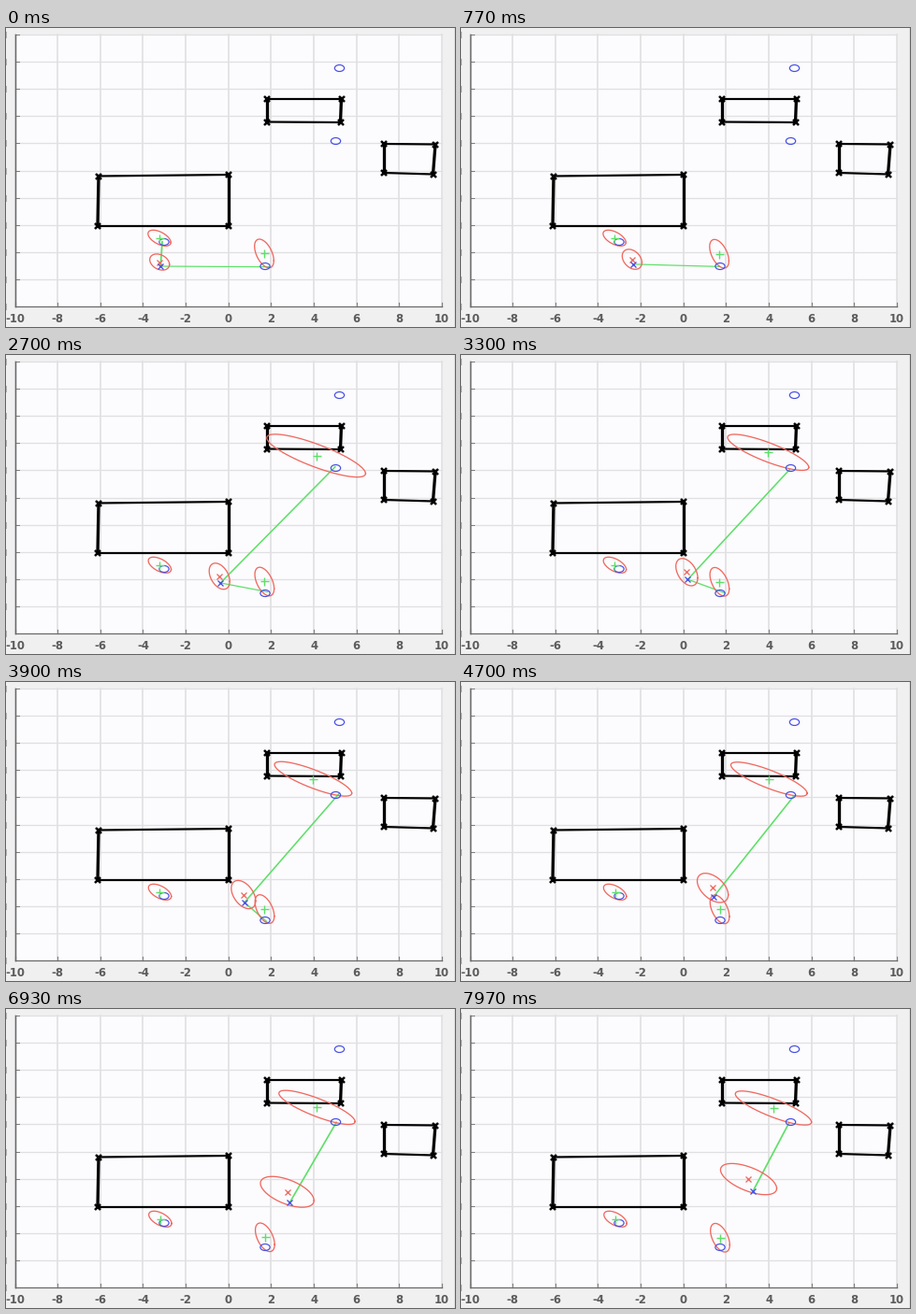
Animation of 480x320 px, one loop 8 s. Source, as a matplotlib script:

```python
import numpy as np
import matplotlib.pyplot as plt
from matplotlib.animation import FuncAnimation
from matplotlib.patches import Ellipse, Rectangle

W, H, DPI = 480, 320, 100
PX = 72 / DPI                      # one pixel in points
FRAMES, STEP = 200, 40
SCALE = np.array([22.83, -14.55])  # pixels per metre
RANGE = 10.08                      # sensor reach, metres
ASPECT = 1.5                       # strokes are wider across than down

RED, GREEN, BLUE = "#f0685f", "#5ce068", "#464fe4"

MARKS = np.array([[169, 229], [277, 255], [352.5, 121], [356.5, 43]])
ROOMS = [[(99, 158.5), (238, 157), (238, 211.5), (98, 211.5)],
         [(279, 75.5), (358.5, 75.5), (357.5, 101), (279, 100.5)],
         [(404, 124), (459, 124.5), (456.5, 156.5), (404, 155)]]

noise = np.random.default_rng(4).normal(0, (3, 1), (FRAMES, 4, 2))


def path(u):
    """True robot position at loop fraction u."""
    return np.array([165.2 + u * (197.4 - 2.8 * u - 47.2 * u * u),
                     255 - u * (19 + 42 * u)])


def pose_oval(u):
    """Estimated position drifts off the path while its spread grows."""
    x, y = path(u)
    return (x - 1 - 4 * u ** 6, y - 4.5 - 8 * u,
            10.5 + 20 / (1 + np.exp((.66 - u) / .09)),
            8.6 + 8.5 * (1 - np.exp(-3 * u)), .3 + .3 * u)


def mark_ovals(u):
    """Landmark estimates; the third shrinks after its first sighting."""
    fresh = np.exp((.3375 - u) / .05)
    return [(164 + u, 224.8, 12.2, 8.5, .55),
            (276 + u, 241.3 + 3.5 * u, 10.3, 15.3, .5),
            (322.5 + 11.5 * u + 5 * fresh, 101 + 5 * u + 4.8 * fresh,
             40.7 + 11.5 * fresh, 18.2 + 4.5 * fresh, .83)]


def outline(cx, cy, a, b, rho):
    """Covariance ellipse with half extents a, b and correlation rho."""
    s = np.linspace(0, 2 * np.pi, 80)
    return (cx + a * np.cos(s),
            cy + b * (rho * np.cos(s) + np.sqrt(1 - rho * rho) * np.sin(s)))


def stroke(dx, dy, width):
    """Width in points of a line drawn along (dx, dy)."""
    return width * PX * np.hypot(dx, ASPECT * dy) / np.hypot(dx, dy)


fig = plt.figure(figsize=(W / DPI, H / DPI), dpi=DPI, facecolor="#f1f0f1")
ax = fig.add_axes([0, 0, 1, 1])
ax.set(xlim=(0, W), ylim=(H, 0))
ax.axis("off")


def line(p, q, color, width, **kw):
    return ax.plot([p[0], q[0]], [p[1], q[1]], color=color,
                   lw=stroke(q[0] - p[0], q[1] - p[1], width), **kw)[0]


def points(style, color, size, width, z=7):
    return ax.plot([], [], color=color, marker=style, ls="", ms=size * PX,
                   mew=width * PX, zorder=z)[0]


# Plot area, grid and labels
ax.add_patch(Rectangle((9.5, 7), 456.5, 291, fc="#fcfbfd", ec="none"))
for k in range(11):
    x, y = 9.5 + 45.65 * k, 7 + 29.1 * k
    line((x, 7), (x, 298), "#e0dfe1", 1.1)
    line((9.5, y), (466, y), "#e0dfe1", 1.3)
    line((x, 294), (x, 298), "#808080", .8)
    line((9.5, y), (14, y), "#808080", 1)
    line((.3, y - 3), (.3, y + 3), "#b0b0b0", .7)
    ax.text(x, 310, str(2 * k - 10), family="DejaVu Sans", weight="bold",
            size=11.6 * PX, color="#5c5c5c", ha="center",
            va="center_baseline")
line((9.5, 7), (9.5, 298), "#686868", 1)
line((9.5, 298), (466, 298), "#686868", 1.2)
line((479.5, 0), (479.5, H), "#303030", .8)

for room in ROOMS:
    for p, q in zip(room, room[1:] + room[:1]):
        line(p, q, "black", 2.2, zorder=3)
    points("x", "black", 6.3, 2.5, 3).set_data(*zip(*room))
for spot in MARKS:
    ax.add_patch(Ellipse(spot, 10.3, 7, fill=False, ec=BLUE, lw=1.2 * PX,
                         zorder=6))

beams = [line((0, 0), (1, 0), GREEN, 1.2, zorder=4) for _ in MARKS]
rings = [line((0, 0), (1, 0), RED, 1.3, zorder=5) for _ in range(4)]
pluses = points("+", GREEN, 9, 1.4, 6)
guess = points("x", RED, 6.5, 1.3)
robot = points("x", BLUE, 6, 1.3)


def draw(i):
    u = i / FRAMES
    pos = path(u)
    ahead = (path(u + .001) - pos) / SCALE
    for beam, mark, off in zip(beams, MARKS, noise[i]):
        ray = (mark - pos) / SCALE
        end = mark + off
        beam.set_data([pos[0], end[0]], [pos[1], end[1]])
        beam.set_linewidth(stroke(*(end - pos), 1.2))
        beam.set_visible(ray @ ahead > 0 and np.hypot(*ray) < RANGE)

    # The third landmark joins the map once it has been in reach
    met = beams[2].get_visible() or u > .5
    known = mark_ovals(u)[:3 if met else 2]
    pose = pose_oval(u)
    rings[3].set_visible(met)
    for ring, oval in zip(rings, [pose] + known):
        ring.set_data(*outline(*oval))
    pluses.set_data([k[0] for k in known], [k[1] for k in known])
    guess.set_data([pose[0]], [pose[1]])
    robot.set_data([pos[0]], [pos[1]])
    return beams + rings + [pluses, guess, robot]


anim = FuncAnimation(fig, draw, frames=FRAMES, interval=STEP, repeat=True,
                     repeat_delay=0, blit=False)
plt.show()
```
